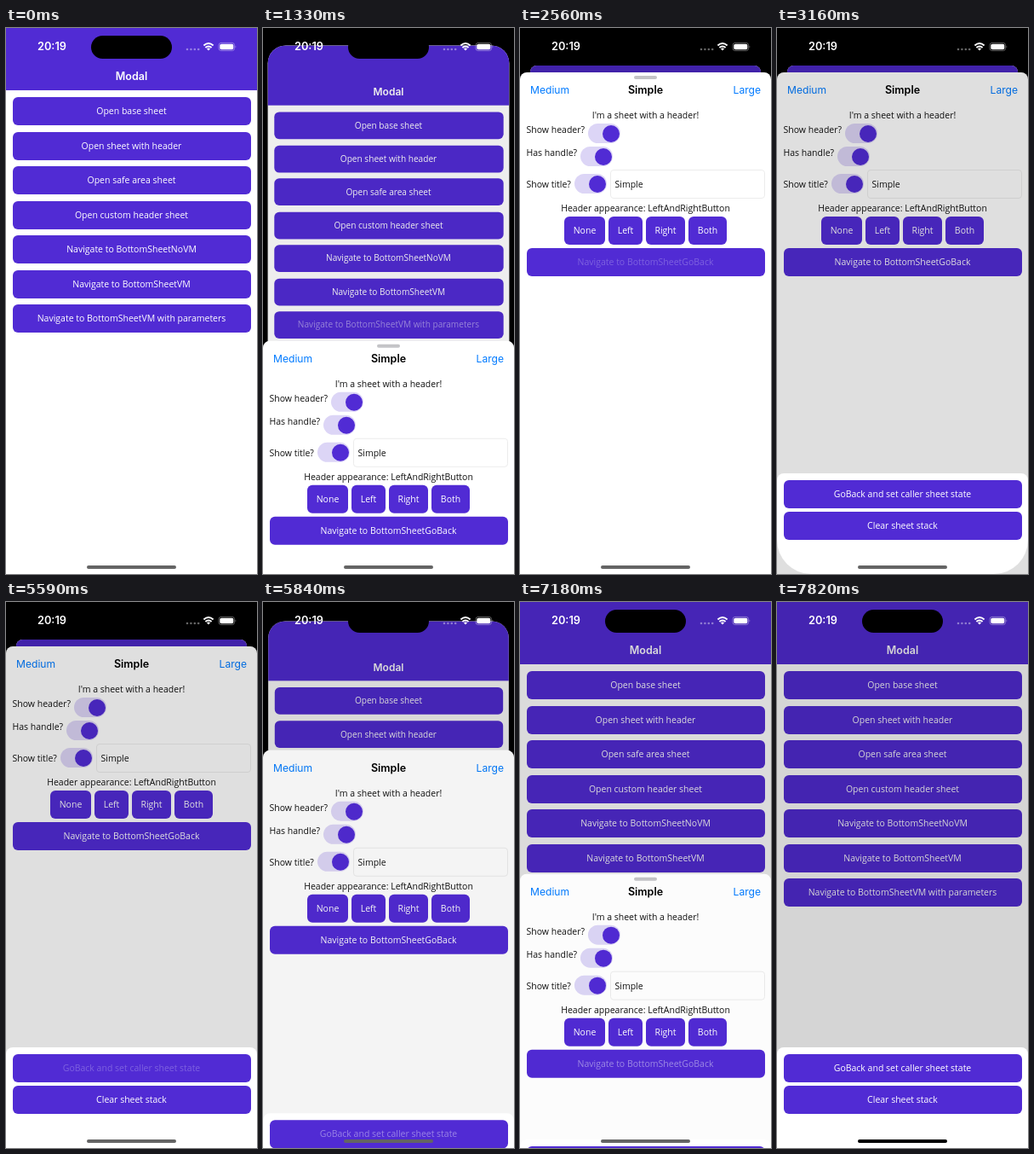
Recreate the animation shown at these times as an HTML page. Size 295x640 px, loop 8 s.

```html
<!DOCTYPE html>
<html lang="en">
<head>
<meta charset="utf-8">
<title>Bottom sheets</title>
<style>
  html, body { margin: 0; width: 100%; height: 100%; overflow: hidden; background: #000; }
  #stage { position: relative; width: 295px; height: 640px; overflow: hidden; background: #000;
    font: 10.5px/14px "Open Sans", sans-serif; color: #111; }
  #stage div, #stage svg { position: absolute; box-sizing: border-box; white-space: nowrap; }
  #page { inset: 0; background: #fff; overflow: hidden; transform-origin: 50% 0; }
  #nav { left: 0; top: 0; width: 295px; height: 73px; background: #512bd4; }
  .btn { background: #512bd4; color: #fff; border-radius: 6px; height: 33px; line-height: 33px; text-align: center; }
  .ui { font-family: Inter, sans-serif; line-height: 16px; font-size: 12.1px; }
  .bold { font-weight: 600; font-size: 12.5px; }
  .center { left: 0; width: 295px; text-align: center; }
  .link { color: #007aff; }
  .sheet { left: 0; top: 0; width: 295px; height: 640px; background: #fff; border-radius: 8px 8px 0 0; overflow: hidden; }
  .toggle { width: 38.3px; height: 23.3px; border-radius: 12px; background: #dcd5f6; }
  .toggle::after { content: ""; position: absolute; right: 1.5px; top: 1.5px; width: 20.3px; height: 20.3px;
    border-radius: 50%; background: #512bd4; }
  #entry { left: 106px; top: 114px; width: 182px; height: 34px; border: 1px solid #ececec; border-radius: 4px;
    padding-left: 4.5px; line-height: 32px; }
  #handle { left: 134px; top: 3.5px; width: 27px; height: 4px; border-radius: 2px; background: #c4c4c7; }
  #island { left: 100px; top: 8.5px; width: 95px; height: 27.5px; border-radius: 14px; background: #000; }
  #status { inset: 0; color: #fff; }
  #home { left: 95px; top: 630px; width: 105px; height: 4px; border-radius: 2px; }
  .shade { inset: 0; background: #000; opacity: 0; }
</style>
</head>
<body>
<div id="stage">
  <div id="page">
    <div id="nav"><div class="ui bold center" style="top:49px;color:#fff">Modal</div></div>
  </div>
  <div id="pageShade" class="shade"></div>
  <div id="form" class="sheet">
    <div id="handle"></div>
    <div class="ui link" style="left:12px;top:13px">Medium</div>
    <div class="ui bold center" style="top:13px;color:#000">Simple</div>
    <div class="ui link" style="right:12px;top:13px">Large</div>
    <div class="center" style="top:42.5px">I'm a sheet with a header!</div>
    <div id="entry">Simple</div>
    <div class="center" style="top:152px">Header appearance: LeftAndRightButton</div>
    <div id="formShade" class="shade" style="z-index:1"></div>
  </div>
  <div id="actions" class="sheet"></div>
  <div id="island"></div>
  <div id="status">
    <div class="ui bold" style="left:37px;top:14px;font-size:12.75px">20:19</div>
    <svg width="295" height="40" fill="currentColor">
      <g opacity=".4">
        <circle cx="213" cy="25" r="1.3"/><circle cx="217.4" cy="25" r="1.3"/>
        <circle cx="221.8" cy="25" r="1.3"/><circle cx="226.2" cy="25" r="1.3"/>
      </g>
      <g fill="none" stroke="currentColor" stroke-width="1.9">
        <path d="M232.4 20.5Q238 15.6 243.6 20.5M234.4 23Q238 19.8 241.6 23"/>
      </g>
      <path d="M238 26.6L235.9 24.3Q238 22.6 240.1 24.3Z"/>
      <rect x="250" y="17.4" width="18.6" height="9.2" rx="2.9" fill="none" stroke="currentColor" stroke-width=".8" opacity=".45"/>
      <rect x="251.3" y="18.7" width="16" height="6.6" rx="1.8"/>
      <path d="M269.6 20.4q1.5 1.6 0 3.2z" opacity=".5"/>
    </svg>
  </div>
  <div id="home"></div>
</div>
<script>
const $ = id => document.getElementById(id);
const LOOP = 8000;

function add(parent, cls, left, top, width, text = '') {
  const el = document.createElement('div');
  el.className = cls;
  el.style.left = left + 'px';
  el.style.top = top + 'px';
  if (width) el.style.width = width + 'px';
  const label = document.createElement('span');
  label.textContent = text;
  el.append(label);
  parent.append(el);
  return label;
}

const pageLabels = [
  'Open base sheet', 'Open sheet with header', 'Open safe area sheet', 'Open custom header sheet',
  'Navigate to BottomSheetNoVM', 'Navigate to BottomSheetVM', 'Navigate to BottomSheetVM with parameters'
].map((text, i) => add($('page'), 'btn', 7.5, 81 + 40.55 * i, 280, text));

[['Show header?', 60, 80, 60], ['Has handle?', 87, 71, 87], ['Show title?', 123.5, 64, 119]]
  .forEach(([text, top, x, y]) => {
    add($('form'), '', 7.5, top, 0, text);
    add($('form'), 'toggle', x, y);
  });
[['None', 52, 48], ['Left', 104, 40], ['Right', 148, 46], ['Both', 198, 45]]
  .forEach(([text, x, w]) => add($('form'), 'btn', x, 169.3, w, text));
const navigate = add($('form'), 'btn', 7.5, 206, 280, 'Navigate to BottomSheetGoBack');
const goBack = add($('actions'), 'btn', 7.5, 8, 280, 'GoBack and set caller sheet state');
add($('actions'), 'btn', 7.5, 44.7, 280, 'Clear sheet stack');

const ticks = [0, 1050, 1210, 1330, 1440, 1550, 1660, 1770, 2560, 2710, 2820, 2930, 3040, 3160, 5590,
  5740, 5840, 5950, 6060, 6170, 6270, 6380, 6490, 6910, 7180, 7290, 7400, 7510, 7620, 7820];

// Critically damped spring from 0 to 1, at rest from `end`.
function spring(t, start, end, rate) {
  if (t <= start) return 0;
  if (t >= end) return 1;
  const x = (t - start) * rate;
  return 1 - (1 + x) * Math.exp(-x);
}

// Label opacity after a tap: dim, then fade back.
const tapped = (t, at) => t < at ? 1 : Math.min(1, 0.25 + Math.max(0, t - at - 150) / 620);
const between = (t, a, b) => t >= a && t < b;
const moveTo = (el, y) => {
  el.style.transform = `translateY(${y}px)`;
  el.style.visibility = y < 640 ? 'visible' : 'hidden';
};

function draw(t) {
  const open = spring(t, 1190, 1770, 0.0112);
  const medium = spring(t, 5740, 6490, 0.0165);
  const shrink = spring(t, 7150, 7620, 0.016);
  const second = spring(t, 2690, 3160, 0.016) - spring(t, 5700, 6170, 0.016) + shrink;
  const large = open - medium;

  $('page').style.transform = `translateY(${44 * large}px) scale(${1 - 0.0815 * large})`;
  $('page').style.borderRadius = large > 0 ? 34 - 26 * large + 'px' : 0;
  $('pageShade').style.opacity = 0.14 * open + 0.06 * large ** 3 + 0.025 * shrink;

  moveTo($('form'), 640 - 588 * open + 248 * medium + 222 * shrink);
  $('formShade').style.opacity = 0.125 * second;
  $('handle').style.opacity = second > 0.3 ? 0 : 1;

  const rounded = between(t, 2710, 5590);
  moveTo($('actions'), 640 - 118 * second);
  $('actions').style.height = rounded ? 118 * second + 'px' : '640px';
  $('actions').style.borderRadius = rounded ? '8px 8px 40px 40px' : '';

  pageLabels[6].style.opacity = tapped(t, 1050);
  navigate.style.opacity = t < 6000 ? tapped(t, 2560) : tapped(t, 6910);
  goBack.style.opacity = t < 6500 ? tapped(t, 5590) : 1;

  $('status').style.color = between(t, 6060, 6380) ? '#000' : '#fff';
  $('home').style.background = t >= 7400 ? '#000' : '#646464';
}

const begin = performance.now();
function frame() {
  const now = (performance.now() - begin) % LOOP;
  draw(ticks.findLast(tick => tick <= now) ?? 0);
  requestAnimationFrame(frame);
}
frame();
</script>
</body>
</html>
```
